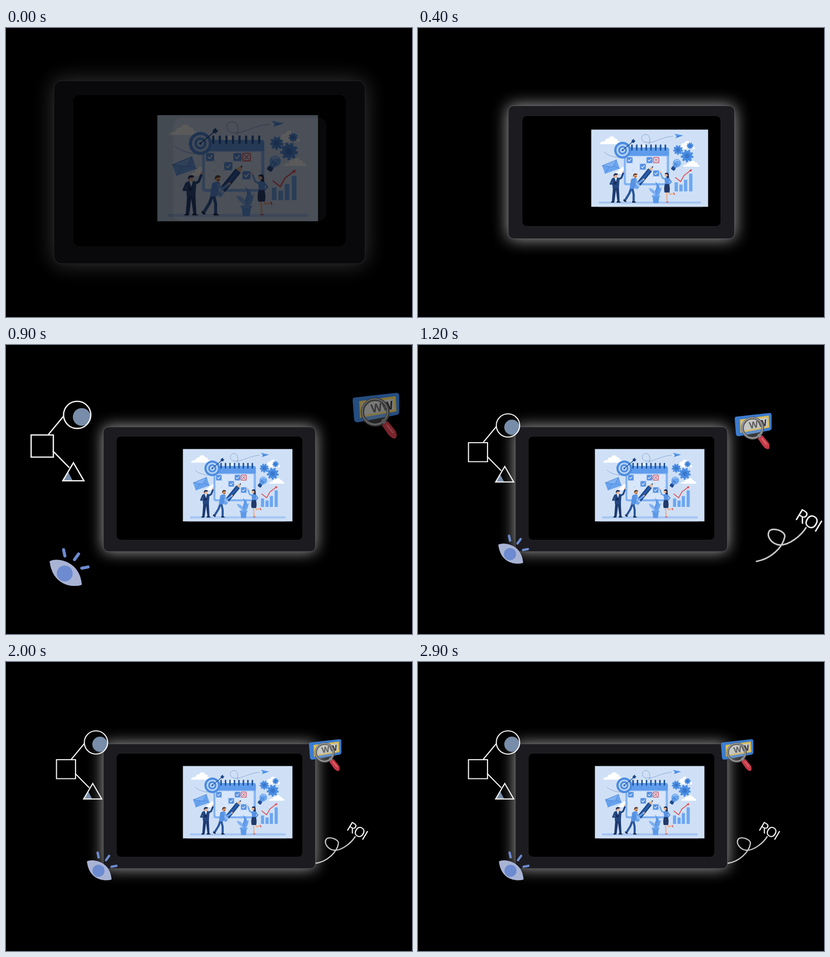
Animation, 800 px wide and 571 px high, one loop 3000 ms. Source, as an HTML page:

```html
<!DOCTYPE html>
<html lang="en">
<head>
<meta charset="utf-8">
<title>Planning board</title>
<style>
  html, body { margin: 0; width: 100%; height: 100%; overflow: hidden; background: #000; }
  svg { display: block; width: 100%; height: 100%; }
  text { font-family: "Open Sans", "Noto Sans", sans-serif; }
  .line { fill: none; stroke-linecap: round; stroke-linejoin: round; }
</style>
</head>
<body>
<svg viewBox="0 0 800 571" xmlns="http://www.w3.org/2000/svg">
  <defs>
    <filter id="blur" x="-25%" y="-35%" width="150%" height="170%"><feGaussianBlur stdDeviation="15"/></filter>
    <filter id="soft"><feGaussianBlur stdDeviation=".45"/></filter>
    <g id="cloud">
      <path d="M0 22C2 15 8 14 13 15C14 7 20 6 23 7C27-2 39-1 41 7C47 6 49 11 48 14C53 13 56 17 56 22Z" fill="#fff"/>
    </g>
  </defs>

  <g id="device">
    <rect x="191.5" y="161.5" width="418.5" height="247" rx="10" fill="#fff" opacity=".66" filter="url(#blur)"/>
    <rect x="191.8" y="161.8" width="418" height="246.4" rx="10" fill="#1c1b20" stroke="#69696e" stroke-width=".8"/>
    <rect x="217.3" y="180.3" width="367.2" height="205" rx="9" fill="#000" stroke="#29292d" stroke-width=".8"/>
  </g>
  <rect id="card" x="352" y="211.5" width="206" height="139" rx="11" fill="#1c1b20"/>

  <g id="picture"><g transform="translate(456.5 277) scale(.6807) translate(-456.5 -277)">
    <rect x="298" y="172" width="317" height="210" fill="#cfe0f6"/>
    <use href="#cloud" transform="translate(321.5 189.5)"/>
    <use href="#cloud" transform="translate(530 202) scale(.88 1.05)"/>
    <use href="#cloud" transform="translate(547 256) scale(.8 .76)"/>
    <use href="#cloud" transform="translate(364 273) scale(.6 .85)"/>
    <use href="#cloud" transform="translate(424 212) scale(.5)"/>
    <rect x="318" y="367.5" width="278" height="6" rx="3" fill="#a6c6f3"/>

    <g class="line" stroke="#2f5f9f" stroke-width="1" stroke-dasharray="2.6 1.6" style="stroke-linecap:butt">
      <path d="M455 211C460 197 455 184 444 185C433 187 432 200 441 205C464 214 485 192 521 190"/>
      <path d="M333 233C343 243 359 247 376 248"/>
    </g>
    <path d="M524 183L547.5 188L530 192Z" fill="#5b9bec"/>
    <path d="M526 195.5L531 190L547.5 188Z" fill="#3b7bd0"/>

    <rect x="386.4" y="221" width="122.6" height="102.5" rx="6" fill="#7fb1f3"/>
    <path d="M386.4 243V227Q386.4 221 392.4 221H503Q509 221 509 227V243Z" fill="#5f9cec"/>
    <rect x="391.5" y="244" width="112" height="74" rx="3" fill="#c8dcf7"/>
    <g id="cells"></g>
    <g id="rings" stroke="#1f5499" stroke-width="4.3" stroke-linecap="round"></g>

    <g id="target"></g>
    <path class="line" d="M383 228L414 202" stroke="#1d4788" stroke-width="1.7"/>
    <path d="M407 207L408 201L414 197L414 201L418 202L414 208Z" fill="#1d4788"/>

    <path d="M327.5 270L366.7 254L375 278L335.4 292Z" fill="#6aa3ee"/>
    <path class="line" d="M335.4 292L348 271M375 278L356 270" stroke="#4583d6" stroke-width="1"/>
    <path d="M327.5 270L356 274L366.7 254Z" fill="#7fb1f3" stroke="#3c78c9" stroke-width="1"/>

    <g id="gears" fill="none"></g>

    <g transform="translate(530 264) rotate(34)">
      <path d="M-5 13C-5 8-11 6-11-1A11 11 0 0 1 11-1C11 6 5 8 5 13Z" fill="#6aa5f0"/>
      <path d="M-7-2A7 7 0 0 1 1-9" class="line" stroke="#cfe0f6" stroke-width="1.6"/>
      <path d="M-2 12L-4 1L0 4L4 1L2 12" class="line" stroke="#2b62b0" stroke-width="1"/>
      <rect x="-5.5" y="12" width="11" height="9.5" rx="3" fill="#1f4a8c"/>
    </g>

    <g id="bars" fill="#6ca6f0"></g>
    <path class="line" d="M526.5 302.5L540.5 313.5L549.8 296.7L569 282" stroke="#e0474b" stroke-width="2.3"/>
    <path d="M564 281.5L571.5 280L569 287Z" fill="#e0474b"/>

    <g transform="translate(466.3 271) rotate(129)">
      <path d="M0 0L15-6.5V6.5Z" fill="#e2b68f"/>
      <path d="M0 0L5-2.2V2.2Z" fill="#1d3c70"/>
      <rect x="14" y="-6.5" width="50" height="13" fill="#1f4a8c"/>
      <rect x="14" y="-2.2" width="50" height="4.4" fill="#2c61ad"/>
      <rect x="63" y="-6.5" width="6" height="13" fill="#9cc1f3"/>
      <path d="M69-6.5H74Q78-6.5 78 0T74 6.5H69Z" fill="#6ba3ec"/>
    </g>

    <path d="M473 352C462 340 483 333 471 314C489 324 485 339 477 352Z" fill="#5b99ea"/>
    <path d="M470 352C468 344 458 345 454 331C467 332 473 341 474 352Z" fill="#7fb1f3"/>
    <path d="M475 352C475 340 480 333 489 329C486 341 485 348 478 352Z" fill="#6ba3ec"/>
    <path d="M464.5 354H482.5L480.5 372H466.5Z" fill="#5b99ea"/>
    <rect x="462.5" y="350.5" width="22" height="5" rx="1" fill="#6ba3ec"/>

    <!-- man with raised hand -->
    <path d="M357 328H373L375 368H369L365 337L361 368H354Z" fill="#1e3a70"/>
    <path d="M351 370.5Q352 366 360 367.5V370.5ZM367 370.5V367.5Q374 365.5 379 370.5Z" fill="#10203f"/>
    <path class="line" d="M373 307L380 303L384.5 291" stroke="#234681" stroke-width="5"/>
    <circle cx="385.5" cy="286.5" r="2.5" fill="#edb08c"/>
    <path d="M354 305Q364 299 375 304L373 332H356Z" fill="#234681"/>
    <path class="line" d="M355 308L350 320L361 319" stroke="#234681" stroke-width="4.5"/>
    <path d="M361 302H368L365 314Z" fill="#e8f1fd"/>
    <rect x="359" y="314" width="8" height="7" fill="#172e5c"/>
    <circle cx="364" cy="298" r="4.8" fill="#edb08c"/>
    <path d="M359 300C357 292 363 289 370 292V295L362 296Z" fill="#182c55"/>

    <!-- man with pencil -->
    <path class="line" d="M407 330L401 346L390 364M409 330L413 348L413 366" stroke="#2a569c" stroke-width="6"/>
    <path d="M386 361L394 368L390 369L385 365ZM409 370.5V367Q416 365 420 370.5Z" fill="#10203f"/>
    <path d="M406 307Q415 301 422 306L415 333H402Z" fill="#5792e3"/>
    <path class="line" d="M418 310L426 318L438 309" stroke="#6ba3ec" stroke-width="5"/>
    <circle cx="440" cy="307.5" r="2.5" fill="#edb08c"/>
    <circle cx="417" cy="297.5" r="4.8" fill="#edb08c"/>
    <path d="M414 299L422 298Q421 304 416 304Z" fill="#b66c35"/>
    <path d="M412 300C410 291 417 289 423 293V295L415 296Z" fill="#694026"/>

    <!-- woman -->
    <path class="line" d="M502 338L504 366M507 338L511 348L522 346" stroke="#edb08c" stroke-width="3.5"/>
    <path class="line" d="M502 369.5L507 368.5M522 344L524 349" stroke="#d4474a" stroke-width="2"/>
    <path class="line" d="M500 308L491 303L486.5 291" stroke="#6ba3ec" stroke-width="4"/>
    <circle cx="485.5" cy="287.5" r="2.2" fill="#edb08c"/>
    <path class="line" d="M509 307L515 314L509 321" stroke="#5792e3" stroke-width="3.5"/>
    <path d="M497 304Q504 300 511 305L509 322H498Z" fill="#5792e3"/>
    <path d="M498 320H509Q513 331 510 343H497Q494 331 498 320Z" fill="#213a6b"/>
    <path d="M498 291Q507 286 508 294L509 304L503 303Z" fill="#1d2c4e"/>
    <circle cx="501.5" cy="295.5" r="4.2" fill="#edb08c"/>
    <path d="M497 293Q500 287 507 291L506 297L503 293Z" fill="#1d2c4e"/>
  </g></g>

  <g id="flow" fill="none" stroke="#f4f4f4" stroke-width="2.2">
    <circle cx="185" cy="162.5" r="15" fill="#788da9" stroke="none"/>
    <path d="M153.5 271L162 255.5L170 271Z" fill="#788da9" stroke="none"/>
    <circle cx="177.3" cy="159" r="23"/>
    <path d="M154.5 161L128 193M136 220L164 248.5M99.5 193H137V230.5H99.5ZM171 240L188.7 270.7H153Z"/>
  </g>

  <g id="eye">
    <path d="M160.500 394.500C174 389 204 396 207 429C194 433 165 430 160.500 394.500Z" fill="#a9b4d5" stroke="#a9b4d5" stroke-width="2" stroke-linejoin="round"/>
    <circle cx="182.300" cy="412.500" r="12" fill="#6d8bd0"/>
    <path class="line" d="M180.500 376.500L182.500 386M203.200 383L197 391.500M208 404.500L217.500 402.700" stroke="#6d8bd0" stroke-width="4.600"/>
  </g>

  <g id="search" filter="url(#soft)">
    <path d="M600 159L657 152.500Q660.500 152.500 660.800 156V179Q660.500 182.500 657 183L604 193Q599.500 193 599 189L597 163Q597 159 600 159Z" fill="#3c7cce"/>
    <path d="M606 164L656 157L657 178L607 187Z" fill="#d9bb55"/>
    <path d="M609 167L653 160.500L654 175.500L610 183.500Z" fill="#c9c9c6"/>
    <text x="623" y="180" font-size="16" font-weight="700" fill="#333336" transform="rotate(-10 623 180)">WW</text>
    <g fill="none">
      <circle cx="628" cy="179" r="17" fill="#bdbdbd" fill-opacity=".3"/>
      <circle cx="628" cy="179" r="17.500" stroke="#5c5c5c" stroke-width="4.600"/>
      <circle cx="627.500" cy="178.500" r="17.500" stroke="#a9a9a9" stroke-width="1.600"/>
    </g>
    <path class="line" d="M639 191L643 196" stroke="#888" stroke-width="5"/>
    <path d="M637 197L645 191.500L656 205Q659 213 655 215.500Q650 215 646 210Z" fill="#c43a48"/>
    <path class="line" d="M644 197L652 207" stroke="#e36b76" stroke-width="2"/>
  </g>

  <g id="roi" filter="url(#soft)">
    <path class="line" d="M688 345C680 358 662 372 648 372C634 371 626 358 631 350C637 344 656 350 655 359C652 376 633 394 611 397.500" stroke="#c9c9c9" stroke-width="2.400"/>
    <text x="669.500" y="331" font-size="27.500" fill="#f4f4f4" transform="rotate(31 669.500 331)" letter-spacing="-1.800">ROI</text>
  </g>
</svg>
<script>
const $ = id => document.getElementById(id);
const times = (n, make) => Array.from({ length: n }, (_, i) => make(i)).join('');

// calendar cells: column + 6 * row
const done = [0, 3, 8, 16], cross = 4;
$('cells').innerHTML = times(24, i => {
  const x = 402 + i % 6 * 18, y = 255 + Math.floor(i / 6) * 18;
  const on = done.includes(i), no = i === cross;
  const mark = on ? 'M-4 0L-1 3L4-3' : no ? 'M-4-4L4 4M4-4L-4 4' : '';
  return `<g transform="translate(${x} ${y})">
    <rect x="-7.5" y="-7.5" width="15" height="15" rx="2.5" fill="${on ? '#5792e3' : '#d6e5fa'}"
      stroke="${no ? '#e0474b' : on ? '#5792e3' : '#eef5fe'}" stroke-width="${no ? 1.8 : 1}"/>
    <path class="line" d="${mark}" stroke="${no ? '#e0474b' : '#fff'}" stroke-width="1.6"/></g>`;
});

$('rings').innerHTML = times(8, i => `<path d="M${408.4 + i * 12.95} 214.3V227"/>`);

const hoops = [[22.8, '#4c8ce0'], [16.5, '#b9d4f7'], [12, '#4c8ce0'], [7, '#b9d4f7'], [2.6, '#2a62b2']];
$('target').innerHTML = hoops.map(([r, c]) => `<circle cx="383" cy="228" r="${r}" fill="${c}"/>`).join('');

const gears = [[533.5, 227.5, 13], [566, 216, 9], [558, 243.5, 17]];
$('gears').innerHTML = gears.map(([x, y, r]) => {
  const step = 2 * Math.PI * r * .88 / 9;
  return `<g transform="translate(${x} ${y})">
    <circle r="${r * .88}" stroke="#4a8de3" stroke-width="${r * .27}" stroke-dasharray="${step * .52} ${step * .48}"/>
    <circle r="${r * .8}" fill="#4a8de3"/>
    <circle r="${r * .4}" fill="#3a78cc"/></g>`;
}).join('');

const bars = [[524, 315.5], [537, 321.5], [549.5, 308.5], [563.5, 292]];
$('bars').innerHTML = bars.map(([x, y]) => `<rect x="${x}" y="${y}" width="9" height="${340 - y}"/>`).join('');

// each part shrinks from 1.5 to 1 about its pivot while it fades in
const LOOP = 3000, STEP = 100, ZOOM = 500, FADE = 100;
const mid = [400.5, 285];
const parts = [
  ['device', -33, mid], ['card', -33, mid], ['picture', -33, [456.5, 277]],
  ['flow', 566, mid], ['eye', 705, mid], ['search', 838, mid], ['roi', 966, mid]
].map(([id, start, pivot]) => ({ el: $(id), start, pivot }));
const clamp = v => Math.min(1, Math.max(0, v));

function draw(t) {
  for (const { el, start, pivot: [x, y] } of parts) {
    const s = 1.5 - .5 * clamp((t - start) / ZOOM);
    el.setAttribute('transform', `translate(${x} ${y}) scale(${s}) translate(${-x} ${-y})`);
    el.setAttribute('opacity', clamp((t - start) / FADE));
  }
}

const begin = performance.now();
function tick() {
  const t = (performance.now() - begin) % LOOP;
  draw(Math.floor(t / STEP) * STEP);
  requestAnimationFrame(tick);
}
tick();
</script>
</body>
</html>
```
